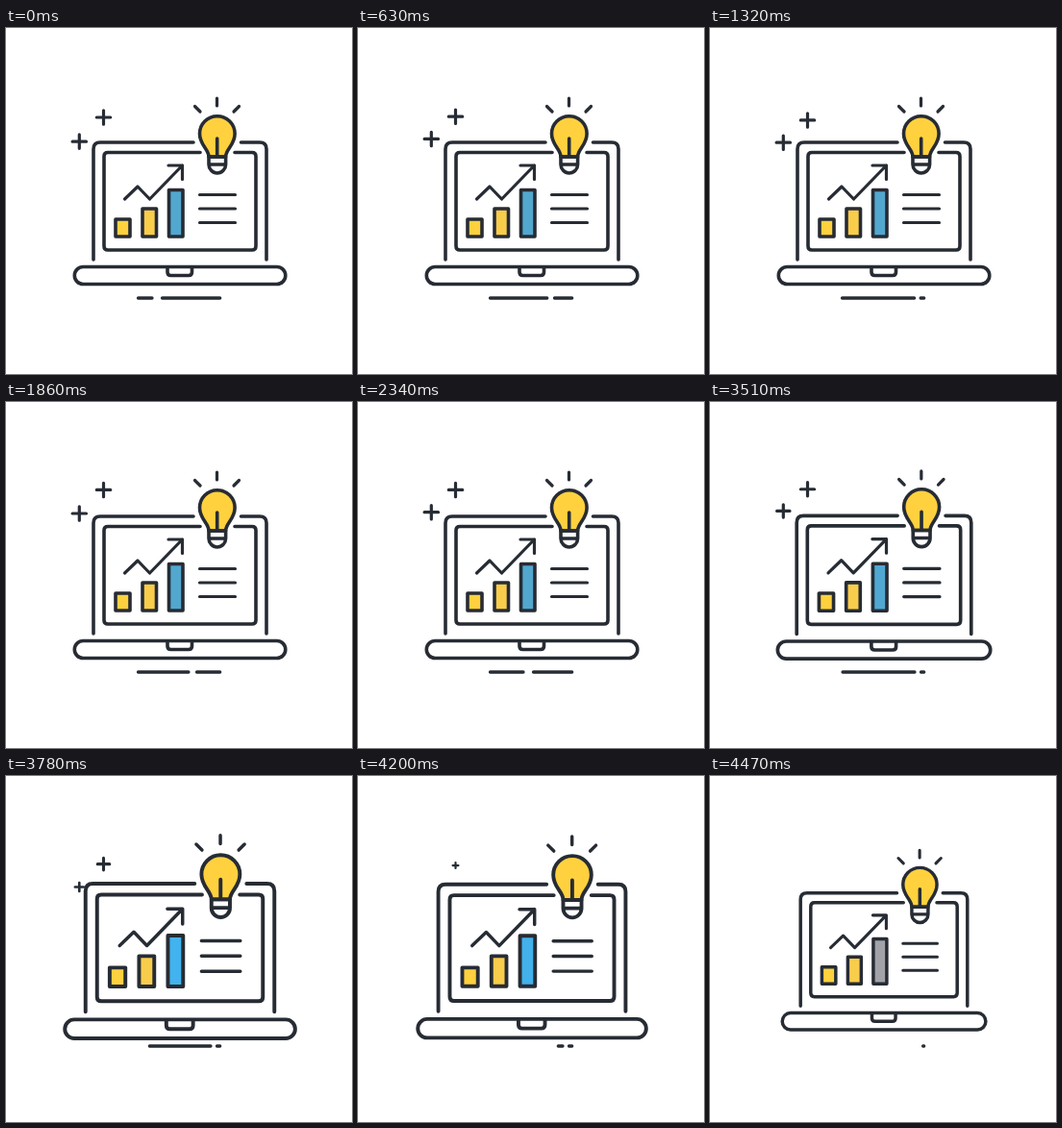
An HTML page for the animation above (4.5 s loop, 360 px wide and 360 px high).

```html
<!DOCTYPE html>
<html lang="en">
<head>
<meta charset="utf-8">
<title>Laptop idea</title>
<style>
  html, body { margin: 0; width: 100%; height: 100%; overflow: hidden; background: #fff; }
  svg { display: block; width: 100vw; height: 100vh; }
</style>
</head>
<body>
<svg viewBox="0 0 360 360" fill="none" stroke="#272c34" stroke-width="3.6" stroke-linecap="round" stroke-linejoin="round">
  <g id="laptop">
    <path d="M91 241V126Q91 119 98 119H195M244.5 119H264Q271 119 271 126V241"/>
    <path d="M202 129.5H106Q102 129.5 102 133.5V227Q102 231 106 231H256Q260 231 260 227V133.5Q260 129.5 256 129.5H238"/>
    <rect x="71.3" y="248.5" width="219.5" height="18" rx="9"/>
    <path d="M168 249V254Q168 257.5 171.5 257.5H190Q193.5 257.5 193.5 254V249"/>
    <g fill="#ffd13e">
      <rect x="114" y="199" width="15" height="18"/>
      <rect x="142" y="188" width="14.5" height="29" fill="#f9cd4c"/>
      <rect id="tall" x="169.5" y="168.5" width="14.5" height="48.5"/>
    </g>
    <g stroke-width="3.2">
      <path d="M123.5 178L137 165L149.5 178L183.5 143M169 143H183.5V157.5"/>
      <path d="M201.5 173.5H238.5M201.5 188H238.5M201.5 202.5H238.5"/>
      <path d="M219.5 73V81M196.5 81.5L202 87M242.5 81.5L237 87"/>
    </g>
    <path fill="#ffd13e" d="M211 134C211 126 201.5 122 201.5 110A18.3 18.3 0 0 1 238.1 110C238.1 122 228.6 126 228.6 134Z"/>
    <path d="M211 134H228.6V142A8.8 9 0 0 1 211 142ZM211 142H228.6M219.7 115V133"/>
  </g>
  <path id="plusA"/>
  <path id="plusB"/>
  <path id="ground" stroke-width="3.3"/>
</svg>
<script>
const LOOP = 4500, SETTLE = 3510;
const el = id => document.getElementById(id);
const laptop = el('laptop'), tall = el('tall'), ground = el('ground');
const plusA = el('plusA'), plusB = el('plusB');

const clamp = p => Math.max(0, Math.min(1, p));
const span = (t, from, to) => clamp((t - from) / (to - from));
const smooth = p => p * p * (3 - 2 * p);
const inOutCubic = p => p < 0.5 ? 4 * p ** 3 : 1 - 4 * (1 - p) ** 3;
const wave = (t, period, phase) => Math.sin(2 * Math.PI * t / period + phase);

// The laptop swells, then falls away faster and faster
const zoom = t => 1 + 0.105 * smooth(span(t, 3430, 3880)) - 0.163 * span(t, 3880, LOOP) ** 3;

function barColor(s) {
  if (s < 0.99) return '#a2a3a9';
  const k = clamp((s - 1) / 0.095);
  return `rgb(${82 - 17 * k},${167 + 12 * k},${207 + 32 * k})`;
}

function drawPlus(node, x, y, shrink) {
  const r = 7.2 * (1 - shrink ** 2);
  node.setAttribute('d', r > 0.3 ? `M${x - r} ${y}H${x + r}M${x} ${y - r}V${y + r}` : '');
  node.setAttribute('stroke-width', Math.min(3.2, 1.4 + r * 0.27));
}

// A gap swings along the line while its left end is trimmed away
function drawGround(t, hold) {
  const swing = ((1 + Math.cos(Math.PI * hold / 1170)) / 2) ** 1.5;
  const reach = 61 - 20 * hold / 2340;
  const start = 137.5 + 85 * inOutCubic(span(t, 3360, 4646));
  const gapStart = 213 - reach * swing;
  const gapEnd = Math.max(start, 219.5 - (reach - 4) * swing);
  const first = start < gapStart ? `M${start} 281H${gapStart}` : '';
  ground.setAttribute('d', `${first}M${gapEnd} 281H222.7`);
}

function draw(t) {
  const s = zoom(t);
  laptop.setAttribute('transform', `translate(181 195) scale(${s}) translate(-181 -195)`);
  tall.setAttribute('fill', barColor(s));

  // Floating stops at SETTLE, then the pluses sink slowly
  const hold = Math.min(t, SETTLE), sink = (t - hold) / 270;
  drawPlus(plusA, 101.5, 93 + 5 * wave(hold, 1200, 0) + sink * 0.9, span(t, 3400, 4440));
  drawPlus(plusB, 76.3, 116.8 + 4 * wave(hold, 1260, 0.35) + sink * 2, span(t, 3300, 4080));
  drawGround(t, hold);
}

let origin = null;
function tick(now) {
  if (origin === null) origin = now;
  draw((now - origin) % LOOP);
  requestAnimationFrame(tick);
}
draw(0);
requestAnimationFrame(tick);
</script>
</body>
</html>
```
